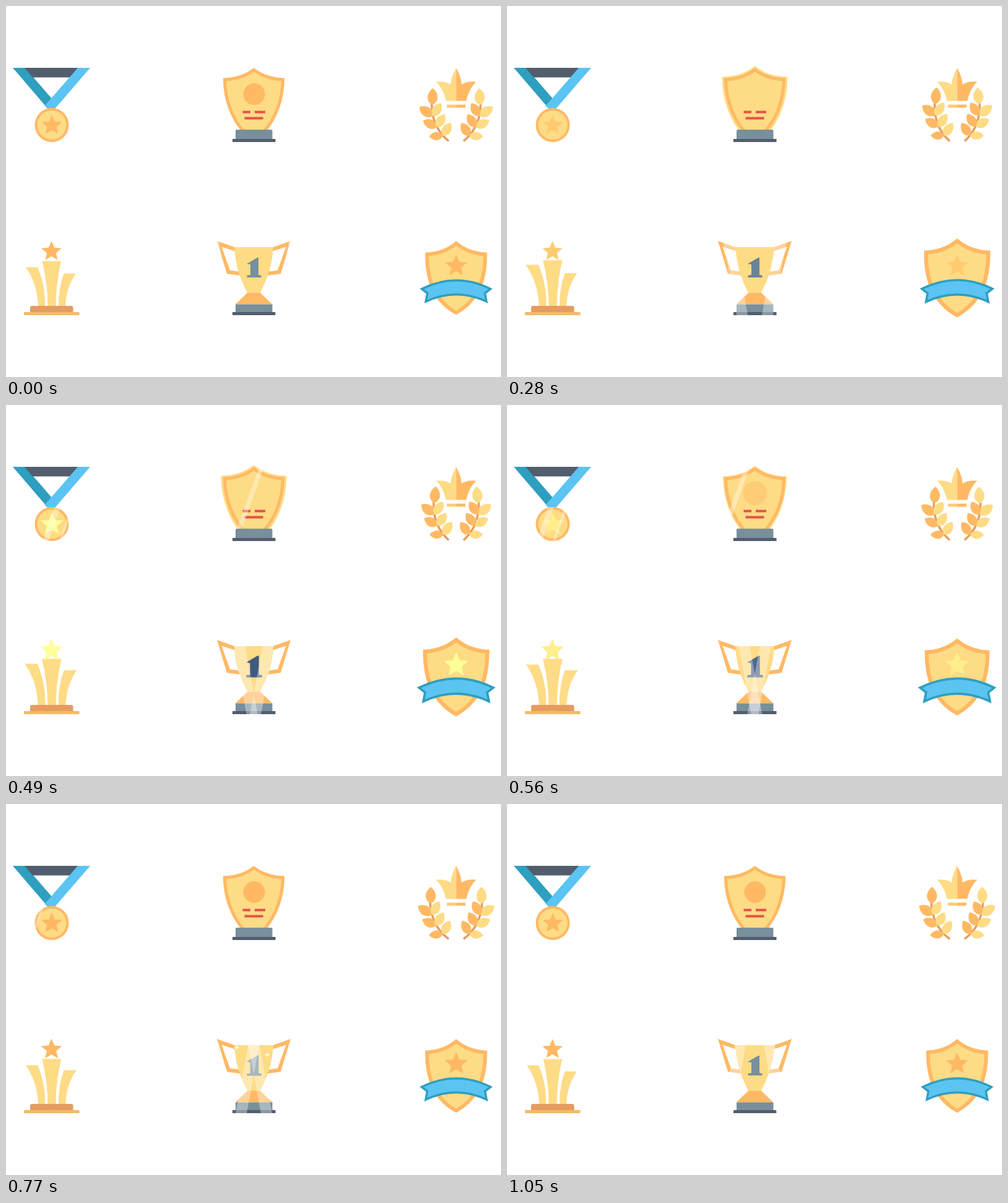
Recreate the animation shown at these times as an HTML page. Size 800 px wide and 600 px high, loop 1.12 s.

```html
<!DOCTYPE html>
<html lang="en">
<head>
<meta charset="utf-8">
<title>Awards</title>
<style>
html, body { margin: 0; width: 100%; height: 100%; overflow: hidden; background: #fff; }
svg { display: block; width: 800px; height: 600px; }
.gold { fill: #fedb85; }
.amber { fill: #ffb964; }
.steel { fill: #788f9c; }
.slate { fill: #525d6e; }
.rim { fill: #fedb85; stroke: #ffb964; stroke-miterlimit: 10; }
.glow { fill: #fedb85; stroke: #fedb85; stroke-miterlimit: 10; }
.shine { fill: #fff; opacity: .35; }
</style>
</head>
<body>
<svg viewBox="0 0 800 600">
  <defs>
    <path id="plaqueShape" stroke-width="5" d="M400.500 103.300Q420 118 447.500 119C447 151 436 182 416 204H385C365 182 354 151 353.500 119Q381 118 400.500 103.300Z"/>
    <path id="spark" fill="#fff" d="M0-5L1-1 5 0 1 1 0 5-1 1-5 0-1-1Z"/>
    <path id="beam" d="M-9 380H9L31 500H13Z"/>
  </defs>

  <!-- medal -->
  <path fill="#2e9fbf" d="M11 100H31L75 151 65 163Z"/>
  <path class="slate" d="M30 100H118L105 115.500H43Z"/>
  <path fill="#5bc4f2" d="M116 100H136L80 165 78 167H68L62.500 161.500Z"/>
  <circle class="amber" cx="74" cy="192.500" r="27.500"/>
  <circle class="gold" cx="74" cy="192.500" r="23.500"/>
  <path class="star" data-x="74" data-y="193" data-r="17"/>
  <path id="medalShine" class="shine" d="M7.500 165H11.500L-8 220H-12ZM-19 165H-10L-29 220H-38Z"/>

  <!-- plaque -->
  <use id="plaqueGlow" class="glow" href="#plaqueShape"/>
  <use class="rim" href="#plaqueShape"/>
  <circle id="seal" cx="401" cy="142.500"/>
  <path fill="#e2544c" d="M382.500 169.500H395V173.500H382.500ZM402 169.500H419V173.500H402ZM385.500 179.500H415.500V183.500H385.500Z"/>
  <path id="plaqueShine" class="shine" d="M14 100H22L-15 204H-23Z"/>
  <rect class="steel" x="371" y="200" width="59.500" height="18" rx="2"/>
  <rect class="slate" x="366" y="215" width="69.500" height="5"/>

  <!-- crown and laurel -->
  <path class="gold" d="M727.500 100C723 109 719 117 719 127Q710 121 695 122.500C704 131 709 143 711 153.500H727.500Z"/>
  <path class="amber" d="M727.500 100C732 109 736 117 736 127Q745 121 760 122.500C751 131 746 143 744 153.500H727.500Z"/>
  <path fill="#fdcc77" d="M712.500 159.500h15v5h-15z"/>
  <path class="amber" d="M727.500 159.500h15v5h-15z"/>
  <g id="leftBranch"></g>
  <g transform="translate(1455 0) scale(-1 1)"><g id="rightBranch"></g></g>

  <!-- star trophy -->
  <path id="horn0" class="gold" d="M32 422.500H51Q64 452 63 486H52Q51 450 32 422.500Z"/>
  <path id="horn1" class="gold" d="M58.500 412.500H89Q80.500 450 80.500 486H67.500Q67.500 450 58.500 412.500Z"/>
  <path id="horn2" class="gold" d="M93.500 432.500H113Q97 455 96 486H85Q85 455 93.500 432.500Z"/>
  <rect fill="#e69c60" x="39" y="485" width="69.500" height="13" rx="3"/>
  <rect fill="#f4ba67" x="29" y="495" width="89.500" height="5"/>
  <path class="star" data-x="73.500" data-y="397" data-r="17"/>

  <!-- cup -->
  <path id="handle" class="amber" fill-rule="evenodd" d="M341 380L372 391 379 436 357 433ZM348.500 389.500L362 427.500 377 429.500 370 396.500Z"/>
  <use href="#handle" transform="translate(801 0) scale(-1 1)"/>
  <path class="gold" d="M369 390H432C430 425 420 445 411 463.500H390C381 445 371 425 369 390Z"/>
  <path class="amber" d="M390.500 463.500H410.500L430.500 482.500H370.500Z"/>
  <rect class="steel" x="371" y="482.500" width="59.500" height="13"/>
  <rect class="slate" x="366" y="495" width="69.500" height="5"/>
  <path id="digit" d="M389 417L406 407H408V434.500Q408 435.500 412.500 435.500V439H389.500V435.500Q395 435.500 395 434.500V418Z"/>
  <use id="beamL" class="shine" href="#beam"/>
  <use id="beamR" class="shine" href="#beam"/>
  <use id="sparkL" href="#spark"/>
  <use id="sparkR" href="#spark"/>

  <!-- shield -->
  <path id="shield" class="rim" stroke-width="6" d="M727.500 384Q747 400 774.500 401.500C775 445 760 478 727.500 496C695 478 680 445 680.500 401.500Q708 400 727.500 384Z"/>
  <path class="star" data-x="727.500" data-y="420.500" data-r="18.500"/>
  <path id="ribbon" fill="#5bc4f2" stroke="#2e9fbf" stroke-width="3.500" d="M672 457.500Q727.500 430 783 457.500L774 464.500 776.500 478Q727.500 455 678.500 478L681 464.500Z"/>
</svg>
<script>
const LOOP = 1120, STEP = 70;
const set = (id, name, value) => document.getElementById(id).setAttribute(name, value);
const move = (id, transform) => set(id, 'transform', transform);
const scaleAt = (id, k, x, y) => move(id, `translate(${x} ${y}) scale(${k}) translate(${-x} ${-y})`);

const ramp = (t, from, to) => Math.min(1, Math.max(0, (t - from) / (to - from)));
// Rises from a to b, holds until c, falls back by d.
const pulse = (t, a, b, c, d) => ramp(t, a, b) - ramp(t, c, d);

const mix = (from, to, k) => `rgb(${[16, 8, 0].map(shift => {
  const u = from >> shift & 255, v = to >> shift & 255;
  return Math.round(u + (v - u) * k);
})})`;

function starPath(x, y, r) {
  const points = Array.from({ length: 10 }, (_, i) => {
    const a = i * Math.PI / 5, q = i % 2 ? r * .46 : r;
    return [x + q * Math.sin(a), y - q * Math.cos(a)];
  });
  return 'M' + points.join('L') + 'Z';
}

// A leaf grows from its base (x, y) along (dx, dy).
function leaf(fill, x, y, dx, dy) {
  const side = (k, w) => [x + dx * k - dy * w, y + dy * k + dx * w];
  return `<path class="${fill}" d="M${x} ${y}C${side(.2, .4)} ${side(.68, .4)} ${x + dx} ${y + dy}` +
    `C${side(.68, -.4)} ${side(.2, -.4)} ${x} ${y}Z"/>`;
}

function growBranch(id, outer, inner) {
  let parts = '<path fill="none" stroke="#e69c60" stroke-width="3.5" d="M715.5 218.5Q688 196 688 158"/>' +
    leaf(outer, 689, 160, 1, -27);
  for (let k = 0; k < 3; k++) {
    const x = 690 + 4 * k + 2 * k * k, y = 178 + 20 * k - 2 * k * k;
    parts += leaf(outer, x, y, -22, 4 * k * k - 15) + leaf(inner, x, y, 13, -21);
  }
  document.getElementById(id).innerHTML = parts;
}
growBranch('leftBranch', 'amber', 'gold');
growBranch('rightBranch', 'gold', 'amber');

const stars = document.querySelectorAll('.star');
const horns = [{ x: 57, grow: .064 }, { x: 74, grow: .028 }, { x: 91, grow: .067 }];

function render(t) {
  const glow = pulse(t, 210, 490, 490, 770);
  const swell = pulse(t, 280, 490, 630, 840);
  const puff = pulse(t, 0, 280, 490, 650);

  for (const star of stars) {
    const { x, y, r } = star.dataset;
    star.setAttribute('d', starPath(+x, +y, r * (1 + .12 * swell)));
    star.setAttribute('fill', mix(0xffb964, 0xffff99, glow));
  }
  move('medalShine', `translate(${74 - (t - 630) * .17})`);

  scaleAt('plaqueGlow', 1 + .07 * puff, 400.5, 146);
  set('seal', 'fill', mix(0xffb964, 0xfedb85, puff));
  set('seal', 'r', 17.5 + 2 * pulse(t, 280, 490, 630, 770));
  move('plaqueShine', `translate(${395 - (t - 490) * .35})`);

  const sway = 3 * puff - 2.7 * pulse(t, 630, 790, 1030, LOOP);
  for (const id of ['leftBranch', 'rightBranch']) move(id, `rotate(${sway} 714 219)`);

  horns.forEach(({ x, grow }, i) => {
    scaleAt('horn' + i, 1 + grow * pulse(t - 90 * i, 70, 280, 490, 710), x, 485);
  });

  set('digit', 'fill', mix(0x788f9c, 0x405a85, glow));
  scaleAt('digit', 1 + .1 * swell, 400.5, 423);
  const beam = 335 + t * .083;
  move('beamL', `translate(${beam})`);
  move('beamR', `translate(${801 - beam}) scale(-1 1)`);
  const twinkle = pulse(t, 560, 740, 780, 900);
  move('sparkL', `translate(373 394) scale(${twinkle})`);
  move('sparkR', `translate(422 405.5) scale(${twinkle})`);

  scaleAt('shield', 1 + .07 * pulse(t, 0, 280, 490, 690), 727.5, 440);
  scaleAt('ribbon', 1 + .08 * pulse(t, 210, 420, 560, 780), 727.5, 462);
}

const start = performance.now();
function tick() {
  const t = (performance.now() - start) % LOOP;
  render(Math.floor(t / STEP) * STEP);
  requestAnimationFrame(tick);
}
tick();
</script>
</body>
</html>
```
